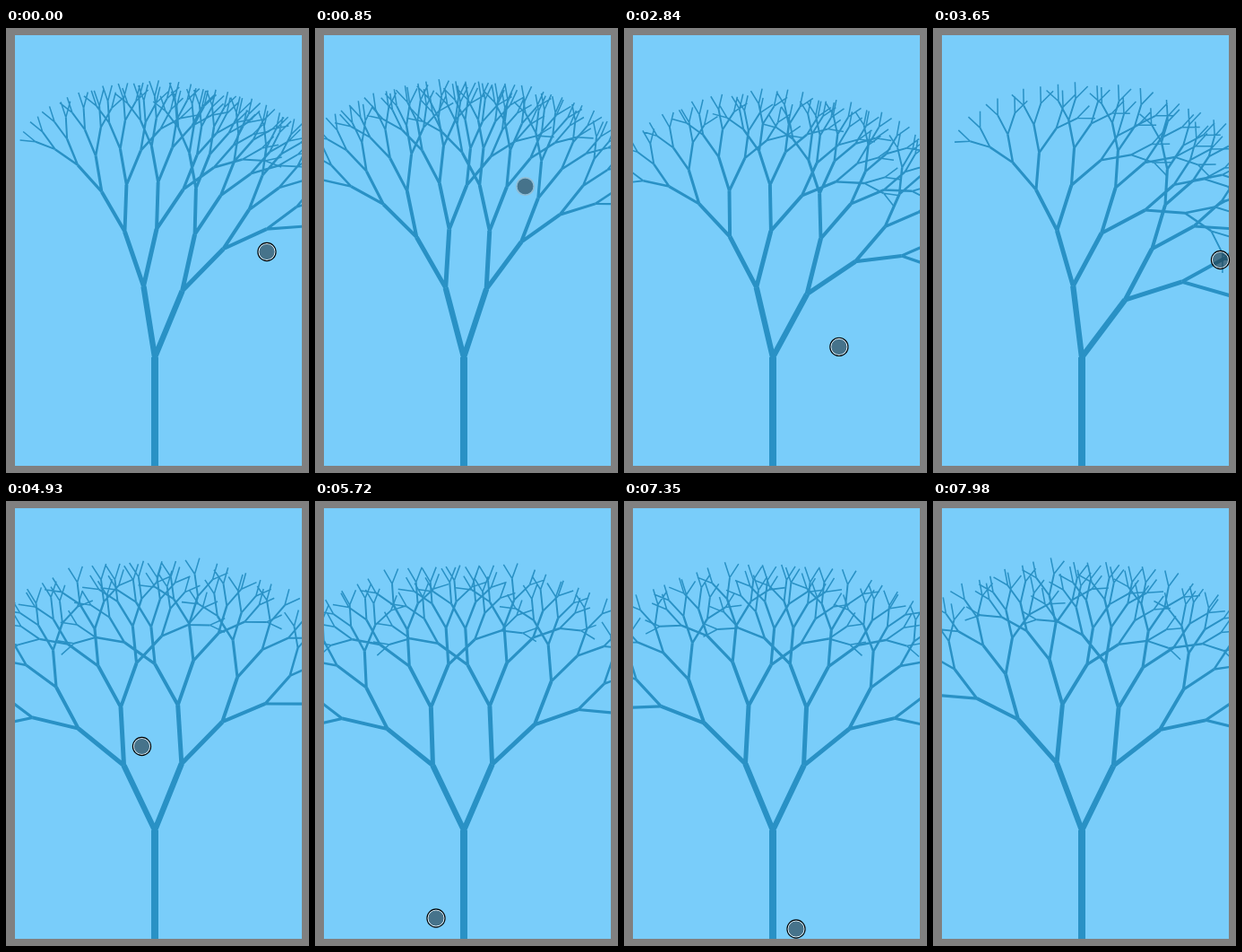
Recreate the animation shown at these times as an HTML page. Size 338 by 496 pixels, loop 8080 ms.

```html
<!DOCTYPE html>
<html lang="en">
<head>
<meta charset="utf-8">
<title>Swaying tree</title>
<style>
  html, body { margin: 0; width: 100%; height: 100%; overflow: hidden; background: #808080; }
  svg { display: block; }
</style>
</head>
<body>
<svg width="338" height="496" viewBox="0 0 338 496">
  <defs><clipPath id="sky"><rect x="10" y="8" width="320" height="480"/></clipPath></defs>
  <rect width="338" height="496" fill="#808080"/>
  <rect x="10" y="8" width="320" height="480" fill="#79cdfa"/>
  <g id="tree" clip-path="url(#sky)" fill="none" stroke="#2991c5"></g>
  <g id="cursor">
    <circle r="9" fill="#1e2c34" fill-opacity=".56"/>
    <g id="ring" fill="none">
      <circle r="9.1" stroke="#fff" stroke-opacity=".9"/>
      <circle r="10.1" stroke="#000" stroke-width="1.1"/>
    </g>
    <circle id="halo" r="9.8" fill="none" stroke="#9fb4bd" stroke-opacity=".7" stroke-width="1.4"/>
  </g>
</svg>
<script>
const LOOP = 8080, LEVELS = 8, TRUNK = 121, FIRST = 80, RAD = Math.PI / 180;

// poses: time, spread and bend in degrees, length ratio
const POSES = [
  [0, 15.75, 6.75, .813],
  [850, 16.5, 1.8, .815],
  [2020, 19.6, 0, .79],
  [3650, 22, 15, .82],
  [4930, 23.7, -1.8, .815],
  [6500, 25.1, -.5, .806],
  [7980, 23.3, 2.85, .813]
];

// drag: time, x, y
const DRAG = [
  [0, 291, 249.5],
  [850, 234.5, 176.5],
  [2020, 157.5, 454.5],
  [3650, 320.5, 258.5],
  [3900, 352, 262],
  [4360, 352, 262],
  [4930, 151.5, 273.5],
  [5440, 148, 409],
  [5720, 135, 465],
  [6500, 98.5, 405.5],
  [7860, 235, 510]
];

const $ = id => document.getElementById(id);
const levels = Array.from({ length: LEVELS }, (_, d) => {
  const path = document.createElementNS('http://www.w3.org/2000/svg', 'path');
  path.setAttribute('stroke-width', 8 * .79 ** d);
  return $('tree').appendChild(path);
});

// eased values of a track at time t
function sample(track, t) {
  const i = track.findIndex(key => key[0] > t);
  if (i < 0) return track[track.length - 1].slice(1);
  const [from, to] = [track[i - 1], track[i]];
  const u = (t - from[0]) / (to[0] - from[0]), e = u * u * (3 - 2 * u);
  return from.map((v, c) => v + (to[c] - v) * e).slice(1);
}

function drawTree(spread, bend, ratio) {
  const data = levels.map(() => '');
  const grow = (x, y, angle, len, d) => {
    const ex = x + len * Math.sin(angle * RAD), ey = y - len * Math.cos(angle * RAD);
    data[d] += `M${x.toFixed(2)} ${y.toFixed(2)}L${ex.toFixed(2)} ${ey.toFixed(2)}`;
    if (d === LEVELS - 1) return;
    // bending fades, twigs shorten and forks open towards the tips
    const lean = bend * (1 - d / LEVELS);
    const fork = spread * (1 + .01 * d);
    for (const side of [-1, 1]) {
      const next = d ? len * (ratio - .012 * (d - 1) + side * bend * .001) : FIRST;
      grow(ex, ey, angle + side * fork + lean, next, d + 1);
    }
  };
  grow(166, 488, 0, TRUNK, 0);
  levels.forEach((path, d) => path.setAttribute('d', data[d]));
}

function render(t) {
  const [x, y] = sample(DRAG, t);
  drawTree(...sample(POSES, t));
  $('cursor').setAttribute('transform', `translate(${x.toFixed(1)} ${y.toFixed(1)})`);
  const soft = t > 650 && t < 1100;
  $('ring').setAttribute('visibility', soft ? 'hidden' : 'visible');
  $('halo').setAttribute('visibility', soft ? 'visible' : 'hidden');
}

const start = performance.now();
function tick() {
  render((performance.now() - start) % LOOP);
  requestAnimationFrame(tick);
}
tick();
</script>
</body>
</html>
```
